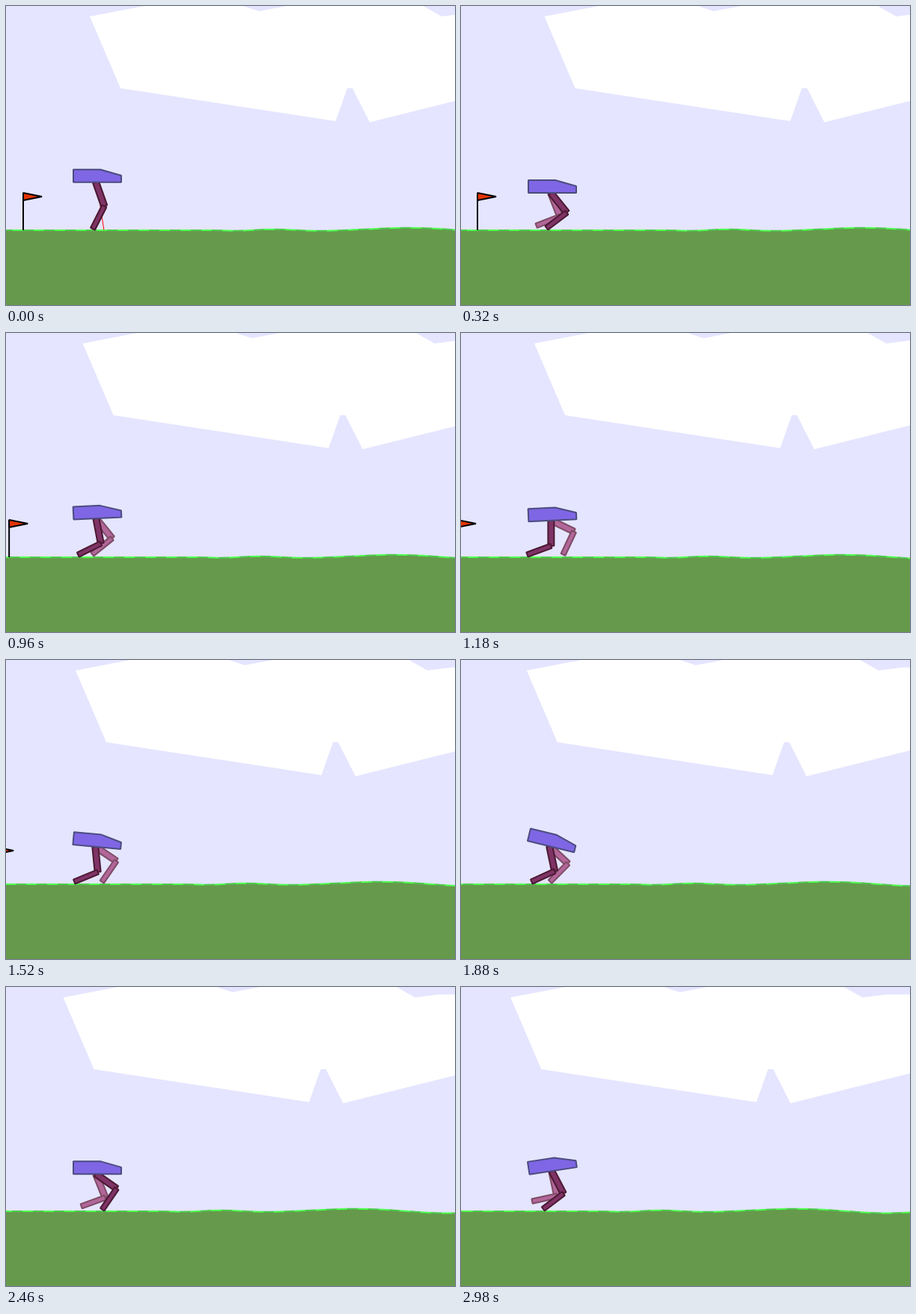
Animation, 600 px wide and 400 px high, one loop 3.02 s. Source, as an HTML page with a canvas:

```html
<!DOCTYPE html>
<html lang="en">
<head>
<meta charset="utf-8">
<title>Two-legged walker</title>
<style>
  html, body { margin: 0; width: 100%; height: 100%; overflow: hidden; background: #e5e5ff; }
  canvas { display: block; }
</style>
</head>
<body>
<canvas id="stage" width="600" height="400"></canvas>
<script>
const ctx = document.getElementById('stage').getContext('2d');
ctx.lineJoin = 'bevel';

const LOOP = 3020, TICK = 20, LAST = 2980;
const HULL_X = 120, FLOOR = 299.5, STEP = 14;
const BONE = 34, THIGH_HALF = 4, SHIN_HALF = 3.2, HIP_DROP = 8;
const FAR = ['#b26699', '#7f4c66'], NEAR = ['#7f3366', '#4c1933'];

// key poses: time, scroll, hull tilt, far thigh, far shin, near thigh, near shin
const POSES = [
  [0, 19, 0, 0.34, -0.47, 0.34, -0.47],
  [320, 20, 0, 0.37, -1.2, 0.68, -0.92],
  [700, 27, -0.05, 0.11, -1.48, 0.43, -0.97],
  [1180, 47, -0.045, 1.12, -0.44, 0, -1.22],
  [1880, 67.5, 0.24, 0.82, -0.78, 0.21, -1.14],
  [2460, 90, 0, 0.38, -1.22, 0.96, -0.6],
  [2980, 110.5, -0.15, 0.21, -1.36, 0.48, -0.92]
];

// crests and dips of the ground, joined by smooth slopes
const HILLS = [[294, 300], [322, 300.7], [378, 298.7], [434, 300.8],
  [560, 296.7], [682, 302.6], [740, 300.5]];

const CLOUD = [[112, 14], [153, 110], [440.5, 154], [456, 110], [463, 110], [486, 155.5],
  [700, 102], [700, 10], [614, 10], [582, 14], [540, -10], [428, -10],
  [338, 7], [287, -10], [237, -10]];
const HULL = [[-30, -9], [6, -9], [34, -1], [34, 8], [-30, 8]];

const smooth = u => u * u * (3 - 2 * u);

// Finds the two keys around v, and how far v lies between them.
function between(keys, v) {
  const next = keys.findIndex(key => key[0] > v);
  const k = next < 0 ? keys.length - 1 : Math.max(1, next);
  const a = keys[k - 1], b = keys[k];
  const u = (v - a[0]) / (b[0] - a[0]);
  return { a, b, u: Math.max(0, Math.min(1, u)) };
}

function groundAt(x) {
  const { a, b, u } = between(HILLS, x);
  return a[1] + (b[1] - a[1]) * smooth(u);
}

function poseAt(t) {
  const { a, b, u } = between(POSES, t);
  return a.map((v, i) => v + (b[i] - v) * (i < 2 ? u : smooth(u)));
}

function shape(points, fill, line) {
  ctx.beginPath();
  points.forEach(([x, y]) => ctx.lineTo(x, y));
  ctx.closePath();
  ctx.fillStyle = fill;
  ctx.fill();
  if (line) {
    ctx.strokeStyle = line;
    ctx.lineWidth = 2;
    ctx.stroke();
  }
}

function segment(x1, y1, x2, y2, color, width = 2) {
  ctx.beginPath();
  ctx.moveTo(x1, y1);
  ctx.lineTo(x2, y2);
  ctx.strokeStyle = color;
  ctx.lineWidth = width;
  ctx.stroke();
}

// Draws one bone and returns its far end.
function bone([x, y], angle, half, colors) {
  const s = Math.sin(angle), c = Math.cos(angle);
  const end = [x + BONE * s, y + BONE * c];
  const dx = half * c, dy = -half * s;
  shape([[x - dx, y - dy], [x + dx, y + dy],
    [end[0] + dx, end[1] + dy], [end[0] - dx, end[1] - dy]], ...colors);
  return end;
}

function leg(hip, thigh, shin, colors) {
  bone(bone(hip, thigh, THIGH_HALF, colors), shin, SHIN_HALF, colors);
}

// Height from hip to the lowest corner of the foot.
const reach = (thigh, shin) =>
  BONE * (Math.cos(thigh) + Math.cos(shin)) + SHIN_HALF * Math.abs(Math.sin(shin));

function drawGround(scroll) {
  const first = Math.floor(scroll / STEP);
  const top = [];
  for (let i = first; i * STEP - scroll < 620; i++) {
    top.push([i * STEP - scroll, groundAt(i * STEP)]);
  }
  shape([...top, [640, 400], [-STEP, 400]], '#66994c');
  top.slice(1).forEach((p, i) =>
    segment(...top[i], ...p, (first + i) % 2 ? '#4ccc4c' : '#4cff4c'));
}

function drawFlag(x) {
  segment(x, 300, x, 250, '#000');
  shape([[x, 250], [x, 260], [x + 25, 255]], '#e63300', '#000');
}

function drawWalker(tilt, farThigh, farShin, nearThigh, nearShin, sensing) {
  const s = Math.sin(tilt), c = Math.cos(tilt);
  // the longer leg stands on the floor and carries the hull
  const hipY = FLOOR - Math.max(reach(farThigh, farShin), reach(nearThigh, nearShin));
  const hip = [HULL_X - HIP_DROP * s, hipY];
  const y = hipY - HIP_DROP * c;

  if (sensing) {
    segment(HULL_X, y, HULL_X + (FLOOR - y) * Math.tan(0.15), FLOOR, '#f00', 1);
  }
  leg(hip, farThigh, farShin, FAR);
  leg(hip, nearThigh, nearShin, NEAR);
  shape(HULL.map(([px, py]) => [HULL_X + px * c - py * s, y + px * s + py * c]),
    '#7f66e5', '#4c4c7f');
}

function draw(t) {
  const [, scroll, ...joints] = poseAt(t);
  const drift = (scroll - POSES[0][1]) / 2;
  ctx.fillStyle = '#e5e5ff';
  ctx.fillRect(0, 0, 600, 400);
  shape(CLOUD.map(([x, y]) => [x - drift, y]), '#fff');
  drawGround(scroll);
  // the range sensor flashes on every fifth tick
  drawWalker(...joints, Math.round(t / TICK) % 5 === 0);
  drawFlag(42 - scroll);
}

const start = performance.now();
function frame() {
  const t = (performance.now() - start) % LOOP;
  draw(Math.min(LAST, Math.floor(t / TICK) * TICK));
  requestAnimationFrame(frame);
}
frame();
</script>
</body>
</html>
```
